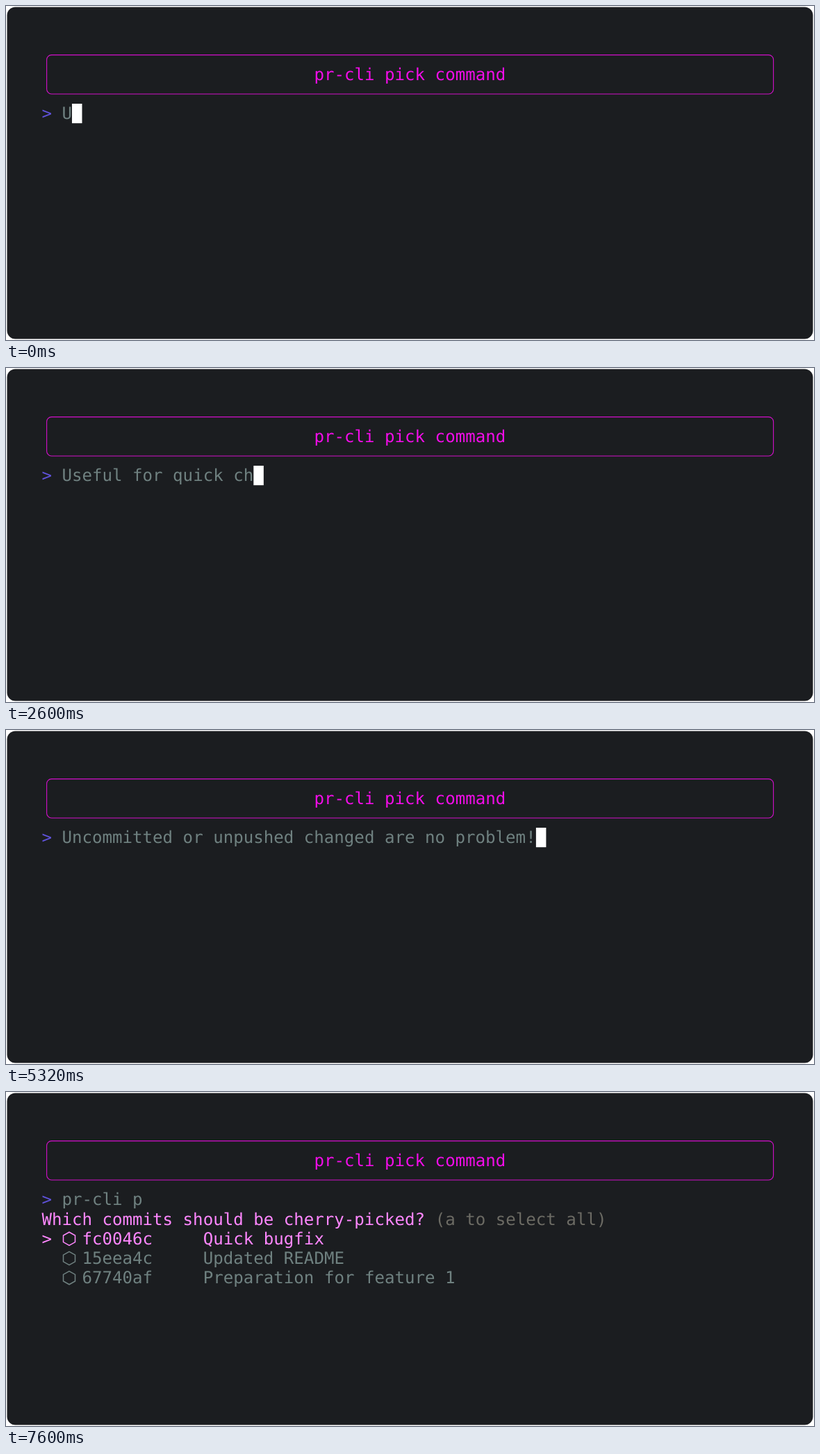
An HTML page that plays this animation: 1163 px wide and 482 px high, repeating every 8 s.

```html
<!DOCTYPE html>
<html lang="en">
<head>
<meta charset="utf-8">
<title>Terminal</title>
<style>
html, body { margin: 0; width: 100%; height: 100%; overflow: hidden; background: #fff; }
svg { display: block; width: 1163px; height: 482px; }
text {
  font: 24.12px "DejaVu Sans Mono", monospace;
  white-space: pre;
  text-rendering: geometricPrecision;
}
</style>
</head>
<body>
<svg id="stage" viewBox="0 0 1163 482"></svg>
<script>
const LOOP = 8000, FRAME = 40;
const LEFT = 51.4, TOP = 56.5, CELL_W = 14.52, CELL_H = 28.17, ASCENT = 22.4;
const GRAY = '#6f8180', PINK = '#ff87ff', HINT = '#6c6b64', PROMPT = '#5f52da', MAGENTA = '#f20de8';
const INPUT_ROW = 3;

const stage = document.getElementById('stage');
const colX = col => LEFT + col * CELL_W;
const rowY = row => TOP + row * CELL_H;

function add(tag, attrs, parent = stage) {
  const el = document.createElementNS('http://www.w3.org/2000/svg', tag);
  for (const key in attrs) el.setAttribute(key, attrs[key]);
  return parent.appendChild(el);
}

function label(col, row, fill, str, parent) {
  const el = add('text', { x: colX(col), y: rowY(row) + ASCENT, fill }, parent);
  el.textContent = str;
  return el;
}

function hexagon(row, color, parent) {
  const y = rowY(row) + CELL_H / 2 + 0.4;
  add('path', {
    d: `M91 ${y - 9.6}l8.5 4.8v9.6l-8.5 4.8l-8.5-4.8v-9.6z`,
    fill: 'none', stroke: color, 'stroke-width': 1.5
  }, parent);
}

// Window and title box
add('rect', { x: 1.5, y: 1.5, width: 1160, height: 479, rx: 12, fill: '#1b1d20' });
add('rect', {
  x: 58.6, y: 70.6, width: 1046, height: 56.4, rx: 7,
  fill: 'none', stroke: MAGENTA, 'stroke-width': 1.1, 'stroke-opacity': 0.85
});
label(27, 1, MAGENTA, 'pr-cli pick command');

// Input line
label(0, INPUT_ROW, PROMPT, '>');
const input = label(2, INPUT_ROW, GRAY, '');
const cursor = add('rect', { width: CELL_W, height: CELL_H, fill: '#fff' });

// Commit menu
const menu = add('g', {});
label(0, 4, PINK, 'Which commits should be cherry-picked?', menu);
label(39, 4, HINT, '(a to select all)', menu);
label(0, 5, PINK, '>', menu);
[
  ['fc0046c', 'Quick bugfix'],
  ['15eea4c', 'Updated README'],
  ['67740af', 'Preparation for feature 1']
].forEach(([hash, subject], i) => {
  const color = i ? GRAY : PINK;
  hexagon(5 + i, color, menu);
  label(4, 5 + i, color, hash, menu);
  label(16, 5 + i, color, subject, menu);
});

// Each phase types or erases one character every `step` ms, the first at `start`.
const NOTE = 'Useful for quick changes or bugfixes';
const BOAST = 'Uncommitted or unpushed changed are no problem!';
const phases = [
  { start: -12.5, step: 51, str: NOTE },
  { start: 2314, step: 17, str: NOTE, erase: true },
  { start: 2926, step: 51, str: BOAST },
  { start: 5832, step: 17.6, str: BOAST, erase: true },
  { start: 6655, step: 99, str: 'pr-cli p' }
];
const ENTER = 7560, MENU = 7600;

function typedAt(t) {
  const { start, step, str, erase } = phases.filter(p => p.start <= t).pop();
  const n = Math.min(str.length, Math.floor((t - start) / step) + 1);
  return str.slice(0, erase ? str.length - n : n);
}

function render(ms) {
  const t = Math.floor((ms % LOOP) / FRAME) * FRAME;
  const typed = typedAt(t);
  const entered = t >= ENTER;
  input.textContent = typed;
  cursor.setAttribute('x', colX(entered ? 0 : 2 + typed.length));
  cursor.setAttribute('y', rowY(entered ? INPUT_ROW + 1 : INPUT_ROW));
  cursor.setAttribute('visibility', t >= MENU ? 'hidden' : 'visible');
  menu.setAttribute('visibility', t >= MENU ? 'visible' : 'hidden');
}

const begin = performance.now();
function tick() {
  render(performance.now() - begin);
  requestAnimationFrame(tick);
}
render(0);
requestAnimationFrame(tick);
</script>
</body>
</html>
```
